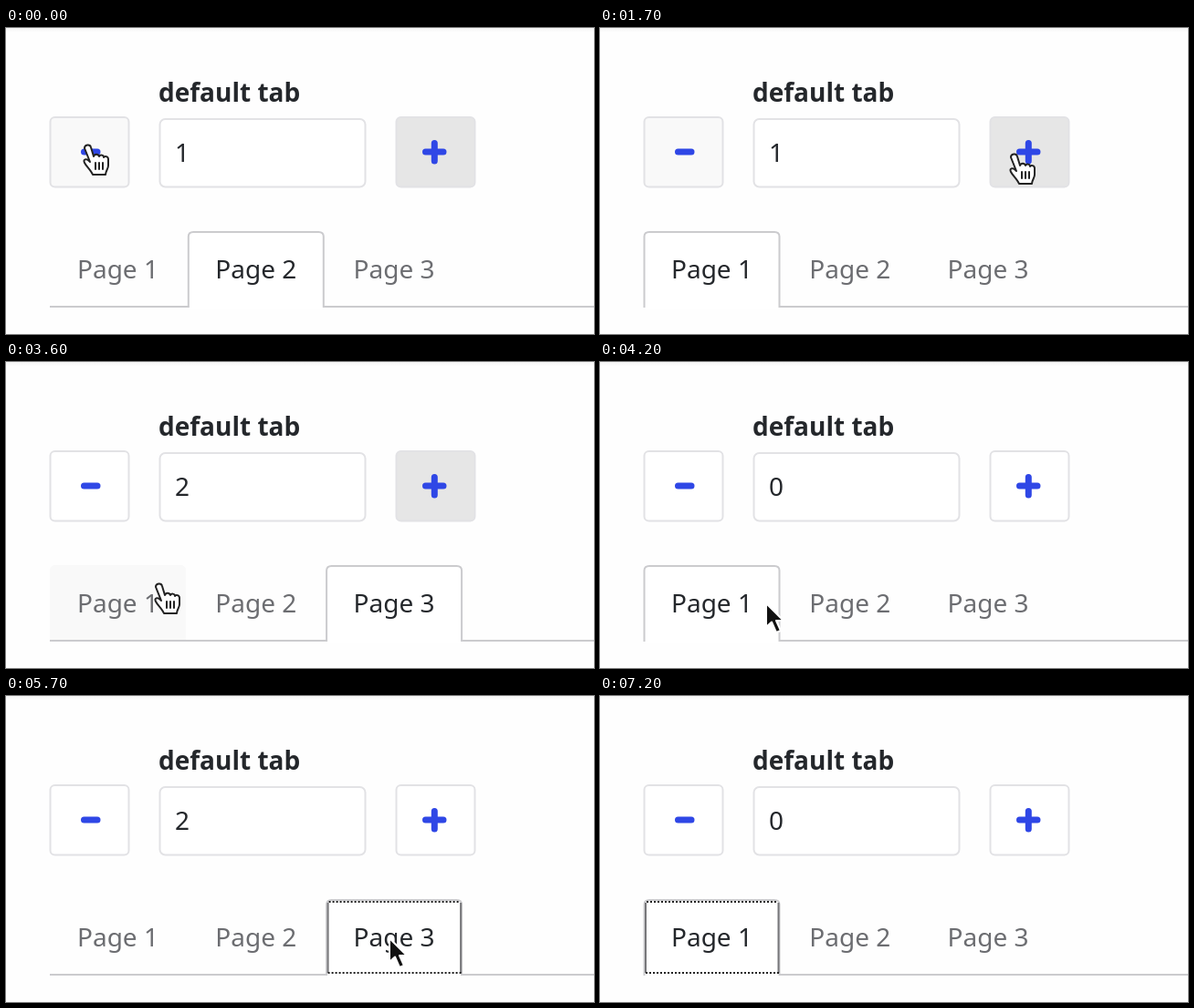
An HTML page for the animation above (8100 ms loop, 644x336 px).

```html
<!DOCTYPE html>
<html lang="en">
<head>
<meta charset="utf-8">
<title>Default tab</title>
<style>
  html, body { margin: 0; width: 100%; height: 100%; overflow: hidden; background: #fefefe; }
  svg { display: block; width: 644px; height: 336px; }
  text { font: 28px "Noto Sans", "Open Sans", sans-serif; fill: #24272b; }
  .label { font-weight: 600; }
  .box { fill: #fff; stroke: #e2e2e5; stroke-width: 2; }
  .edge { fill: none; stroke: #cbcbce; stroke-width: 2; }
  .icon { stroke: #2f47e6; stroke-width: 7; stroke-linecap: round; }
  .dots { stroke: #222; stroke-width: 2; stroke-dasharray: 2 2; }
  .side { stroke: #77777a; stroke-width: 2; }
  .cursor { stroke-linejoin: round; stroke-linecap: round; }
</style>
</head>
<body>
<svg viewBox="0 0 644 336">
  <defs>
    <linearGradient id="shade" x2="0" y2="1">
      <stop stop-color="#f5f5f5"/><stop offset="1" stop-color="#fefefe"/>
    </linearGradient>
  </defs>
  <rect width="644" height="5" fill="url(#shade)"/>
  <text class="label" x="167" y="81">default tab</text>
  <rect id="minus" class="box" x="48.5" y="98" width="86" height="76.5" rx="5"/>
  <path class="icon" d="M85.5 136H100" />
  <rect class="box" x="168.5" y="100" width="225" height="74.5" rx="6"/>
  <text id="value" x="185" y="147"></text>
  <rect id="plus" class="box" x="427.5" y="98" width="86" height="76.5" rx="5"/>
  <path class="icon" d="M459.5 136H479M469.3 126.5V146"/>
  <path class="edge" d="M48 306H644"/>
  <g id="tabs"></g>
  <g id="hand" class="cursor" fill="#fff" stroke="#222" stroke-width="2">
    <path d="M-4 1C-4-3 2-4 3 0L6 10C7 7 11 7 12 10C13 8 17 8 17 11C18 9 22 10 22 13V20C22 24 19 26 19 30H5C3 25-2 21-4 17C-6 13-2 12 1 15L2 16Z"/>
    <path d="M8 17V24M12 17V24M16 17V24"/>
  </g>
  <path id="arrow" class="cursor" fill="#111" stroke="#fff" stroke-width="2"
        d="M0 0V26L6 20.5L11 32L16 30L11 19H19Z"/>
</svg>
<script>
const $ = id => document.getElementById(id);
const LOOP = 8100, STEP = 100, PITCH = 151.3;

$('tabs').innerHTML = [1, 2, 3].map((n, i) => `
  <g transform="translate(${48 + i * PITCH} 0)">
    <path class="fill" d="M0 305V229Q0 223 6 223H143Q149 223 149 229V305Z"/>
    <g class="front">
      <path d="M1 308V229Q1 224 6 224H143Q148 224 148 229V308Z" fill="#fff"/>
      <path class="edge" d="M.5 307V229Q.5 224 6 224H143Q148.5 224 148.5 229V307"/>
    </g>
    <g class="focus">
      <path class="side" d="M2 227V304M147.5 227V304"/>
      <path class="dots" d="M3 226H147M2 304H148"/>
    </g>
    <text x="30" y="275">Page ${n}</text>
  </g>`).join('');
const tabs = [...$('tabs').children].map(g => ({
  fill: g.querySelector('.fill'), front: g.querySelector('.front'),
  focus: g.querySelector('.focus'), text: g.querySelector('text')
}));

// [time, state]
const values = [[0, 1], [300, 0], [1600, 1], [2800, 2], [3900, 0], [4700, 1], [5600, 2], [6400, 0]];
const pages = [[0, 1], [500, 0], [1900, 1], [3000, 2], [3900, 0], [4700, 1], [5600, 2], [6400, 0]];
const FOCUS_FROM = 4700, CURSOR_GONE = 6600;

// [start, end] of each hover
const plusHover = [[-500, 300], [1000, 3600]];
const tabHover = [
  [[3500, 3900], [5900, 6400]],
  [[4300, 4700], [5800, 6300]],
  [[5000, 5600]]
];

// [time, x, y] of the pointer tip
const path = [
  [0, 90, 131], [400, 90, 131], [700, 290, 75], [1000, 455, 130], [1300, 454, 141],
  [3100, 454, 141], [3600, 168, 246], [3900, 170, 250], [4200, 182, 265], [4300, 182, 265],
  [4600, 285, 268], [4800, 285, 268], [5000, 359, 262], [5300, 420, 266], [5700, 420, 266],
  [6200, 155, 269], [LOOP, 155, 269]
];

const clamp = v => Math.min(1, Math.max(0, v));
const at = (list, t) => list.findLast(e => e[0] <= t)[1];
const level = (spans, t) =>
  Math.max(...spans.map(([a, b]) => Math.min(clamp((t - a) / 300), clamp(1 - (t - b) / 300))));
const gray = (depth, k) => { const c = Math.round(255 - depth * k); return `rgb(${c},${c},${c})`; };
const show = (el, on) => el.setAttribute('visibility', on ? 'visible' : 'hidden');

function pointer(t) {
  const i = path.findIndex(p => p[0] > t);
  const [t0, x0, y0] = path[i - 1], [t1, x1, y1] = path[i];
  const k = (t - t0) / (t1 - t0), e = k * k * (3 - 2 * k);
  return [x0 + (x1 - x0) * e, y0 + (y1 - y0) * e];
}

function clickable(x, y, page) {
  if (y > 97 && y < 175) return (x > 47 && x < 135) || (x > 427 && x < 514);
  const tab = Math.floor((x - 48) / PITCH);
  return y > 223 && y < 306 && tab >= 0 && tab < 3 && tab !== page;
}

function draw(t) {
  const page = at(pages, t);
  $('value').textContent = at(values, t);
  $('minus').style.fill = gray(6, level([[-500, 1800]], t));
  $('plus').style.fill = gray(25, level(plusHover, t));
  tabs.forEach((tab, i) => {
    const active = i === page, hover = level(tabHover[i], t);
    tab.fill.style.fill = gray(19, hover);
    tab.fill.style.opacity = hover ? 1 : 0;
    show(tab.front, active);
    show(tab.focus, active && t >= FOCUS_FROM);
    tab.text.style.fill = active ? '#24272b' : '#6c6d71';
  });
  const [x, y] = pointer(t), hand = clickable(x, y, page), seen = t < CURSOR_GONE;
  show($('hand'), seen && hand);
  show($('arrow'), seen && !hand);
  for (const id of ['hand', 'arrow']) $(id).setAttribute('transform', `translate(${x} ${y})`);
}

const start = performance.now();
function tick() {
  const t = (performance.now() - start) % LOOP;
  draw(Math.floor(t / STEP) * STEP);
  requestAnimationFrame(tick);
}
tick();
</script>
</body>
</html>
```
